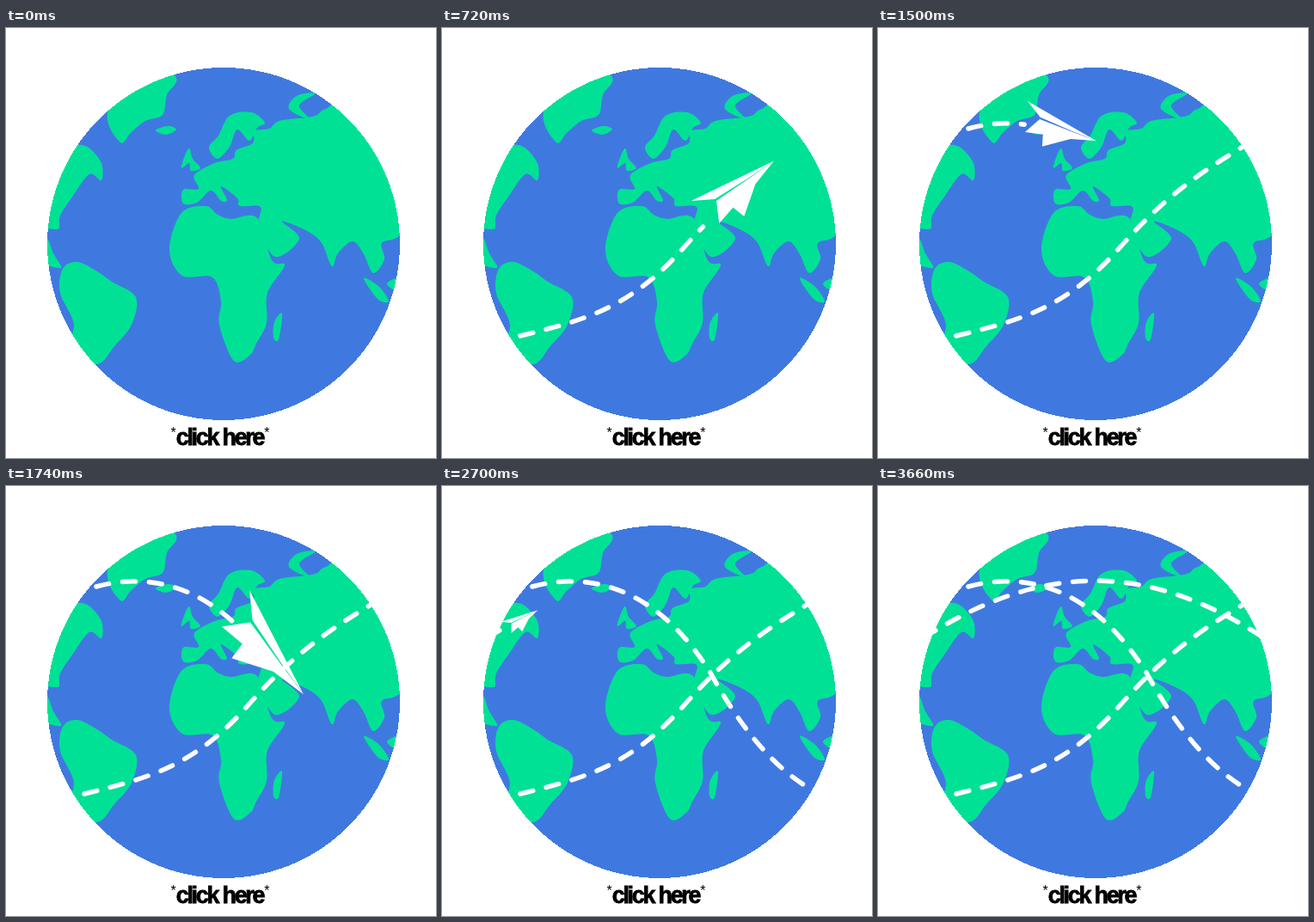
Recreate the animation shown at these times as an HTML page. Size 500 px wide and 500 px high, loop 3.84 s.

```html
<!DOCTYPE html>
<html lang="en">
<head>
<meta charset="utf-8">
<title>Paper plane around the globe</title>
<style>
  html, body { margin: 0; width: 100%; height: 100%; overflow: hidden; background: #fff; }
  svg { display: block; width: 100%; height: 100%; }
  #land { fill: #00e196; }
  #trails { fill: none; stroke: #fff; stroke-width: 5.5; stroke-linecap: round; }
  #plane { fill: #fff; }
  text { font: 700 27px "Liberation Sans", Arial, sans-serif; letter-spacing: -2.3px; text-anchor: middle; stroke: #000; stroke-width: .8px; }
  .star { font-size: 16px; font-weight: 400; letter-spacing: 0; stroke: none; }
</style>
</head>
<body>
<svg viewBox="0 0 500 500">
  <rect width="500" height="500" fill="#3f79e0"/>
  <g id="land"></g>
  <path fill="#fff" fill-rule="evenodd" shape-rendering="crispEdges"
    d="M0 0H500V500H0ZM48 251a205 205 0 0 0 410 0a205 205 0 0 0-410 0Z"/>
  <g id="trails"></g>
  <g id="plane">
    <path d="M-24-34 90 0 50-6 0-15Z"/>
    <path d="M0-12 50-5 90 0 52 6 13 27 10 9-17 12Z"/>
  </g>
  <text x="249" y="485"><tspan class="star" dy="-9">*</tspan><tspan dy="9">click here</tspan><tspan class="star" dx="1" dy="-9">*</tspan></text>
</svg>
<script>
const LOOP = 3840, STEP = 60, SPEED = 0.435, DASH = 15, GAP = 16, MARGIN = 30;

// Key points of each coast, joined by a smooth closed curve
const coasts = {
  greenland: "118,97 133,133 145,122 162,108 182,101 187,78 197,56 150,30",
  iceland: "174,119 188,114 198,118 186,124",
  northAmerica: "88,136 110,155 111,177 97,170 78,195 63,218 60,234 35,220 55,150",
  centralAmerica: "47,244 55,262 64,279 40,270",
  southAmerica: "66,280 83,272 106,283 123,295 151,313 146,345 126,370 106,391 70,380 79,345 63,308",
  africa: "204,215 232,207 246,217 262,222 292,221 309,270 324,276 304,308 303,343 291,367 284,380 265,387 248,345 250,318 240,290 205,288 190,258",
  madagascar: "321,332 317,362 311,360 312,342",
  britain: "213,140 217,152 226,163 215,166 213,157 204,163 207,151",
  scandinavia: "236,139 247,125 260,102 285,98 301,110 292,116 283,131 269,118 260,138 246,152",
  arctic: "353,106 329,94 338,79 360,76 341,90",
  eurasia: "206,188 224,187 219,171 243,157 264,152 268,142 287,134 289,120 306,117 318,108 350,104 362,101 372,94 410,85 485,200 458,241 437,250 440,269 427,285 416,263 403,248 386,262 379,277 367,250 350,236 321,225 341,245 313,266 294,230 296,208 272,207 269,198 250,184 257,200 250,201 238,189 222,203 206,204",
  sumatra: "416,291 434,301 445,318 432,315",
  borneo: "443,297 466,288 460,308"
};

// start: time at the route's first point; lag: distance the trail stays behind the plane
const flights = [
  { start: 64, lag: 32, size: 1.01, drop: 0, tilt: 0,
    route: "M91 358C165 340 217 326 277 260C321 210 358 176 440 129" },
  { start: 1312, lag: 16, size: 1.16, drop: 0, tilt: 0,
    route: "M105 117C175 98 252 121 312 217C341 270 377 319 420 347" },
  { start: 2628, lag: 16, size: 0.97, drop: 12, tilt: -5,
    route: "M54 176C190 89 312 88 446 175" }
];

function closedCurve(text) {
  const pts = text.split(" ").map(p => p.split(",").map(Number));
  const at = i => pts[(i + pts.length) % pts.length];
  const handle = (p, a, b) => [p[0] + (b[0] - a[0]) / 6, p[1] + (b[1] - a[1]) / 6];
  return "M" + pts[0] + pts.map((p, i) => {
    const next = at(i + 1);
    return `C${handle(p, at(i - 1), next)} ${handle(next, at(i + 2), p)} ${next}`;
  }).join("") + "Z";
}

function addPath(parent, d) {
  const path = document.createElementNS("http://www.w3.org/2000/svg", "path");
  path.setAttribute("d", d);
  return document.getElementById(parent).appendChild(path);
}

for (const coast of Object.values(coasts)) addPath("land", closedCurve(coast));
for (const f of flights) {
  f.path = addPath("trails", f.route);
  f.length = f.path.getTotalLength();
}

const plane = document.getElementById("plane");

function drawTrail(f, shown) {
  const end = Math.min(shown, f.length);
  f.path.style.display = end > 0 ? "" : "none";
  const pattern = [];
  for (let s = 0; s < end; s += DASH + GAP) pattern.push(Math.min(DASH, end - s), GAP);
  pattern[pattern.length - 1] = 9999;
  f.path.setAttribute("stroke-dasharray", pattern.join(" "));
}

// Follows the route, running straight on past either end
function drawPlane(f, s) {
  const near = Math.max(1, Math.min(f.length - 1, s));
  const a = f.path.getPointAtLength(near - 1), b = f.path.getPointAtLength(near + 1);
  const angle = Math.atan2(b.y - a.y, b.x - a.x);
  const x = (a.x + b.x) / 2 + (s - near) * Math.cos(angle);
  const y = (a.y + b.y) / 2 + (s - near) * Math.sin(angle);
  const scale = f.size * Math.sin(Math.PI * (s + MARGIN) / (f.length + 2 * MARGIN));
  plane.setAttribute("transform",
    `translate(${x} ${y}) rotate(${angle * 180 / Math.PI + f.tilt}) scale(${scale}) translate(0 ${f.drop})`);
}

function render(now) {
  const t = Math.floor((now % LOOP) / STEP) * STEP;
  plane.style.display = "none";
  for (const f of flights) {
    const s = (t - f.start) * SPEED;
    drawTrail(f, s - f.lag);
    if (s > -MARGIN && s < f.length + MARGIN) {
      plane.style.display = "";
      drawPlane(f, s);
    }
  }
}

const begin = performance.now();
function tick() {
  render(performance.now() - begin);
  requestAnimationFrame(tick);
}
tick();
</script>
</body>
</html>
```
